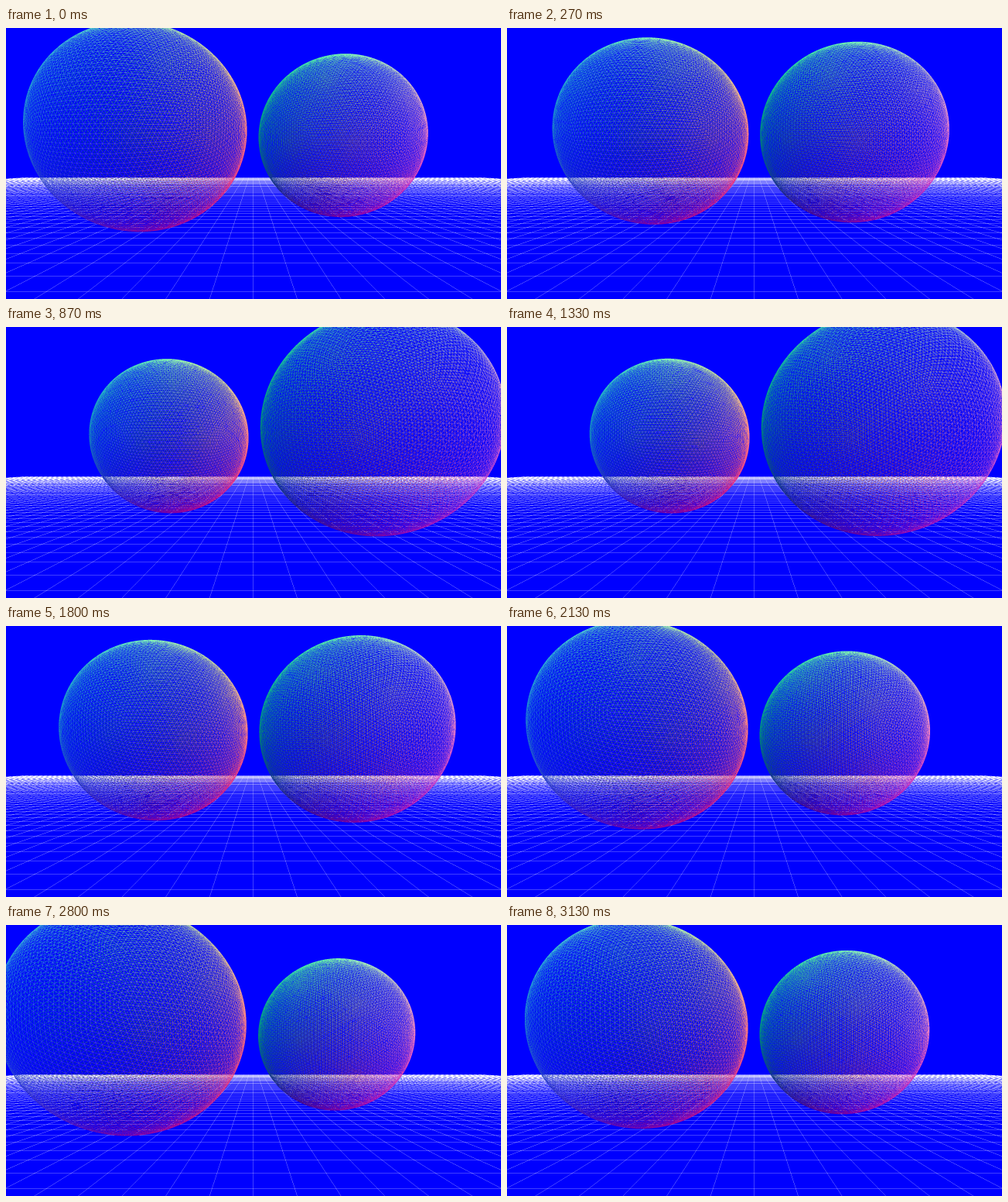
Write an HTML page with a canvas that moves like this. It is 640 px wide and 350 px high and loops after 3.19 s.

```html
<!DOCTYPE html>
<html lang="en">
<head>
<meta charset="utf-8">
<title>Wire spheres</title>
<style>
  html, body { margin: 0; width: 100%; height: 100%; overflow: hidden; background: #00f; }
  canvas { display: block; width: 640px; height: 350px; }
</style>
</head>
<body>
<canvas id="stage" width="640" height="350"></canvas>
<script>
// Hairlines are drawn on a 4x buffer and averaged down.
const OUT_W = 640, OUT_H = 350, SCALE = 4;
const W = OUT_W * SCALE, H = OUT_H * SCALE, CX = W / 2 - 0.5, CY = H / 2;
const FOCAL = CY / Math.tan(25 * Math.PI / 180);
const LOOP = 3190, STEP = 1000 / 15;
const HELD = [14, 33, 34, 39];
// time in ms, phase of the swing in radians
const SWING = [[0, -2.177], [600, -0.983], [867, -0.51], [1333, 0.54],
               [1800, 1.49], [2533, 2.93], [3133, 4.118], [3200, 4.25]];
const RADIUS = 15, SIDE = 16, LIFT = 5, CAMERA = 50, REACH = 10;
const DETAIL = 32, SPIN = 0.0003;
const BLUE = 0xffff0000, WHITE = 0xffffffff;

const ctx = document.getElementById('stage').getContext('2d');
const image = ctx.createImageData(OUT_W, OUT_H);
const output = new Uint32Array(image.data.buffer);
const pixels = new Uint32Array(W * H);
const depth = new Float32Array(W * H);

// Depth is kept as 1/distance, which is linear on screen.
function line(x0, y0, w0, x1, y1, w1, color) {
  const dx = x1 - x0, dy = y1 - y0;
  const n = Math.max(1, Math.ceil(Math.max(Math.abs(dx), Math.abs(dy))));
  const sx = dx / n, sy = dy / n, sw = (w1 - w0) / n;
  for (let i = 0; i < n; i++, x0 += sx, y0 += sy, w0 += sw) {
    if (x0 < 0 || y0 < 0 || x0 >= W || y0 >= H) continue;
    const p = (y0 | 0) * W + (x0 | 0);
    if (w0 >= depth[p]) {
      depth[p] = w0;
      pixels[p] = color;
    }
  }
}

function drawGrid() {
  const cell = 3.235, floor = 10, half = 50, near = 6.5, far = 63;
  const put = (x0, k0, x1, k1) => {
    const a = 1 / (k0 * cell), b = 1 / (k1 * cell);
    line(CX + x0 * cell * FOCAL * a, CY + floor * FOCAL * a, a,
         CX + x1 * cell * FOCAL * b, CY + floor * FOCAL * b, b, WHITE);
  };
  for (let i = -half; i <= half; i++) put(i, near, i, far);
  for (let k = 7; k <= far; k++) put(-half, k, half, k);
}

// Icosahedron with each face split into a fine triangular lattice.
function buildSphere() {
  const t = (1 + Math.sqrt(5)) / 2, corners = [], points = [], edges = [];
  for (const a of [-1, 1]) for (const b of [-t, t]) {
    corners.push([b, a, 0], [a, 0, b], [0, b, a]);
  }
  const near = (p, q) => Math.hypot(p[0] - q[0], p[1] - q[1], p[2] - q[2]) < 2.1;

  function addFace(a, b, c) {
    const rows = [];
    for (let i = 0; i <= DETAIL; i++) {
      rows.push([]);
      for (let j = 0; j <= DETAIL - i; j++) {
        const v = a.map((n, m) => n * (DETAIL - i - j) + b[m] * i + c[m] * j);
        const len = Math.hypot(...v);
        rows[i].push(points.length);
        points.push(v.map(n => n / len));
      }
    }
    for (let i = 0; i < DETAIL; i++) for (let j = 0; j < DETAIL - i; j++) {
      const p = rows[i][j], q = rows[i + 1][j], r = rows[i][j + 1];
      edges.push(p, q, q, r, r, p);
    }
  }

  for (let i = 0; i < 12; i++) for (let j = i + 1; j < 12; j++) for (let k = j + 1; k < 12; k++) {
    const a = corners[i], b = corners[j], c = corners[k];
    if (near(a, b) && near(b, c) && near(a, c)) addFace(a, b, c);
  }
  return { points, edges: Uint16Array.from(edges) };
}

const sphere = buildSphere();
const count = sphere.points.length;
const sx = new Float32Array(count), sy = new Float32Array(count);
const sw = new Float32Array(count), tint = new Uint32Array(count);

function drawSphere(x, distance, angle) {
  const c = Math.cos(angle), s = Math.sin(angle);
  for (let i = 0; i < count; i++) {
    const p = sphere.points[i];
    const nx = p[0] * c + p[2] * s, ny = p[1], nz = p[2] * c - p[0] * s;
    const w = 1 / (distance - nz * RADIUS);
    sx[i] = CX + (x + nx * RADIUS) * FOCAL * w;
    sy[i] = CY - (LIFT + ny * RADIUS) * FOCAL * w;
    sw[i] = w;
    // colour follows the surface direction
    const r = 127.5 + 127.5 * nx, g = 127.5 + 127.5 * ny, b = 127.5 + 127.5 * nz;
    tint[i] = (255 << 24 | b << 16 | g << 8 | r) >>> 0;
  }
  const e = sphere.edges;
  for (let i = 0; i < e.length; i += 2) {
    const a = e[i], b = e[i + 1];
    line(sx[a], sy[a], sw[a], sx[b], sy[b], sw[b], tint[a]);
  }
}

// Averages each block; red and blue are summed side by side in one number.
function shrink() {
  const area = SCALE * SCALE;
  for (let y = 0, o = 0; y < OUT_H; y++) for (let x = 0; x < OUT_W; x++, o++) {
    let rb = 0, g = 0;
    for (let v = 0; v < SCALE; v++) {
      const row = (y * SCALE + v) * W + x * SCALE;
      for (let u = 0; u < SCALE; u++) {
        const p = pixels[row + u];
        rb += p & 0xff00ff;
        g += p >> 8 & 255;
      }
    }
    const r = (rb & 0xffff) / area, b = (rb >> 16) / area;
    output[o] = (255 << 24 | b << 16 | g / area << 8 | r) >>> 0;
  }
}

function swingAt(time) {
  let i = 1;
  while (i < SWING.length - 1 && time > SWING[i][0]) i++;
  const [t0, a] = SWING[i - 1], [t1, b] = SWING[i];
  return a + (b - a) * (time - t0) / (t1 - t0);
}

pixels.fill(BLUE);
drawGrid();
const basePixels = pixels.slice(), baseDepth = depth.slice();

function draw(time) {
  pixels.set(basePixels);
  depth.set(baseDepth);
  const shift = REACH * Math.cos(swingAt(time));
  drawSphere(-SIDE, CAMERA + shift, time * SPIN);
  drawSphere(SIDE, CAMERA - shift, time * SPIN);
  shrink();
  ctx.putImageData(image, 0, 0);
}

let shown = -1;
function tick() {
  let slot = Math.floor((performance.now() % LOOP + 4) / STEP);
  slot = Math.min(slot, 47);
  while (HELD.includes(slot)) slot--;
  if (slot !== shown) {
    shown = slot;
    draw(slot * STEP);
  }
  requestAnimationFrame(tick);
}
tick();
</script>
</body>
</html>
```
